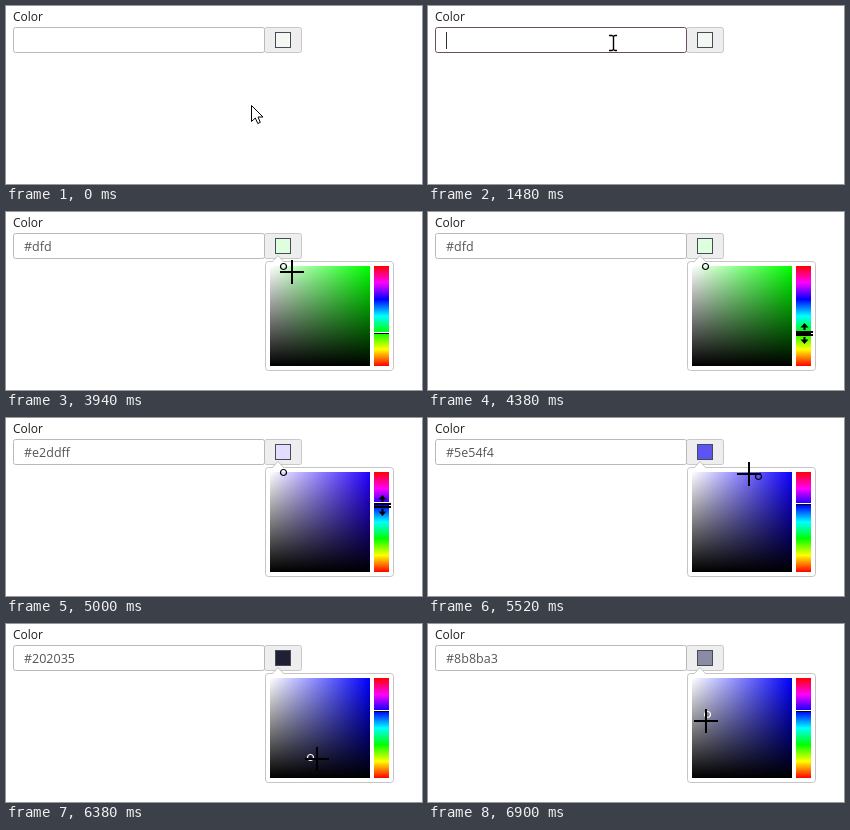
An HTML page that plays this animation: 416x178 px, repeating every 6920 ms.

```html
<!DOCTYPE html>
<html lang="en">
<head>
<meta charset="utf-8">
<title>Color field</title>
<style>
  html, body { margin: 0; width: 100%; height: 100%; overflow: hidden; background: #fff; }
  svg { display: block; width: 416px; height: 178px; font-family: "Open Sans", sans-serif; }
  .crisp { shape-rendering: crispEdges; }
</style>
</head>
<body>
<svg viewBox="0 0 416 178">
  <defs>
    <linearGradient id="saturation">
      <stop stop-color="#fff"/>
      <stop id="pureHue" offset="1"/>
    </linearGradient>
    <linearGradient id="darkness" x2="0" y2="1">
      <stop stop-opacity="0"/>
      <stop offset="1"/>
    </linearGradient>
    <linearGradient id="rainbow" x2="0" y1="1" y2="0"></linearGradient>
  </defs>

  <text x="7" y="15" font-size="12" font-weight="500" fill="#222">Color</text>
  <rect x="258.5" y="21.5" width="37" height="25" rx="2" fill="#eee" stroke="#c8c8c8"/>
  <rect id="field" x="7.5" y="21.5" width="251" height="25" rx="2" fill="#fff"/>
  <rect id="swatch" x="269.5" y="26.5" width="15" height="15" stroke="#444c55"/>
  <text id="value" x="18" y="39" font-size="12.5" fill="#555"></text>
  <rect id="caret" class="crisp" y="26" width="1" height="17" fill="#333"/>

  <g id="popup">
    <rect x="259.5" y="49.5" width="128" height="109" rx="3" fill="#fff" stroke="#c4c4c4"/>
    <path d="M266 50L272 43.5L278 50" fill="#fff" stroke="#c4c4c4"/>
    <path d="M267 50.5H277" stroke="#fff"/>
    <rect x="264" y="54" width="100" height="100" fill="url(#saturation)"/>
    <rect x="264" y="54" width="100" height="100" fill="url(#darkness)"/>
    <rect x="368" y="54" width="15" height="100" fill="url(#rainbow)"/>
    <g id="hueMark" class="crisp">
      <rect x="368" y="-1" width="15" height="1" fill="#fff"/>
      <rect x="368" width="15" height="1"/>
    </g>
    <circle id="handle" r="3" fill="none" stroke-width="1.2"/>
  </g>

  <g id="cursor">
    <path id="arrow" d="M.5 .5V16.5L4.3 13L6.8 18.5L9.3 17.4L7 12H12Z" fill="#fff" stroke="#000"/>
    <path id="ibeam" d="M-4 -7.5H-1L.5 -6.5L2 -7.5H4M.5 -6.5V6.5M-4 7.5H-1L.5 6.5L2 7.5H4" fill="none" stroke="#000" stroke-width="1.4"/>
    <path id="hand" d="M-1.5 11V.5Q0 -2 1.5 .5V7L10 8.5Q11.5 9 11 13L9 19.5H0L-5.5 12Q-5 9 -1.5 12Z" fill="#fff" stroke="#000"/>
    <path id="cross" class="crisp" d="M-12 0H12M0 -12V12" stroke="#000" stroke-width="2"/>
    <g id="resize">
      <path d="M-8 -1.5H9M-8 1.5H9" stroke="#000" stroke-width="2" class="crisp"/>
      <path d="M.5 -10L4.5 -5.5H1.5V-3H-.5V-5.5H-3.5ZM.5 11L4.5 6.5H1.5V4H-.5V6.5H-3.5Z"/>
    </g>
  </g>
</svg>
<script>
const LOOP = 6920, STEP = 20;
const FOCUS = 860, TYPED = [1560, 1920, 2080, 2260], MOUSE_BACK = 2520, POPUP = 3600;
const HUE_PRESS = 4620, SQUARE_PRESS = 5420, DRAG_LAG = 20;
const CURSORS = ['arrow', 'ibeam', 'hand', 'cross', 'resize'];

// Straight mouse moves: start, end, destination x, y
const moves = [
  [60, 80, 246, 99], [360, 880, 185, 37], [2880, 3320, 278, 38],
  [3820, 3940, 286, 60], [3940, 4380, 376, 121], [4620, 5000, 376, 87], [5100, 5420, 352, 97]
];

const $ = id => document.getElementById(id);
const set = (id, attrs) => {
  for (const name in attrs) $(id).setAttribute(name, attrs[name]);
};
const show = (id, on) => set(id, { visibility: on ? 'visible' : 'hidden' });
const clamp = u => Math.max(0, Math.min(1, u));
const ease = (t, from, to) => {
  const u = clamp((t - from) / (to - from));
  return u * u * (3 - 2 * u);
};

// Counterclockwise loops over the colour square, gradually slowing down.
function scribble(t) {
  const s = (t - 5900 + DRAG_LAG) / 1000;
  const angle = (-39.9 + 639.3 * s - 67 * s * s) * Math.PI / 180;
  return [315.32 + 37.07 * Math.cos(angle), 95.3 - 40.17 * Math.sin(angle)];
}

function mouse(t) {
  if (t >= SQUARE_PRESS) return scribble(t);
  return moves.reduce(([x, y], [from, to, toX, toY]) => {
    const u = ease(t, from, to);
    return [x + (toX - x) * u, y + (toY - y) * u];
  }, [245, 99]);
}

function hueAt(t) {
  const dragged = 120 + 128.8 * ease(t, HUE_PRESS, 5000) - 5.2 * ease(t, 5100, 5200);
  return t < 6060 ? dragged : 240;
}

function hsvHex(h, s, v) {
  return '#' + [5, 3, 1].map(n => {
    const k = (n + h / 60) % 6;
    const c = v * (1 - s * Math.max(0, Math.min(k, 4 - k, 1)));
    return Math.round(c * 255).toString(16).padStart(2, '0');
  }).join('');
}

function cursorKind(x, y, open) {
  if (y < 48) return x < 259 ? 'ibeam' : 'hand';
  if (open && y >= 54 && x >= 264 && x <= 364) return 'cross';
  if (open && y >= 54 && x >= 367) return 'resize';
  return 'arrow';
}

function draw(t) {
  const [x, y] = mouse(t), hue = hueAt(t);
  const open = t >= POPUP, focused = t >= FOCUS && !open;
  const typing = t >= TYPED[0] && t < MOUSE_BACK;
  const complete = t >= TYPED[3];

  const [px, py] = t < SQUARE_PRESS ? [264 + 100 * 34 / 255, 54] : scribble(t - DRAG_LAG);
  const brightness = (154 - py) / 100;
  const picked = hsvHex(hue, (px - 264) / 100, brightness);

  $('value').textContent = t >= HUE_PRESS ? picked : '#dfd'.slice(0, TYPED.filter(k => k <= t).length);
  set('swatch', { fill: complete ? picked : '#f5f7f2' });
  set('field', { stroke: focused ? '#6a5064' : '#bdb8bc' });
  set('caret', { x: 18 + Math.round($('value').getComputedTextLength()) });
  show('caret', focused && (typing || (t - FOCUS) % 620 < 260));

  set('popup', { opacity: clamp((t - POPUP + STEP) / 100) });
  set('pureHue', { 'stop-color': hsvHex(hue, 1, 1) });
  set('hueMark', { transform: `translate(0 ${Math.round(154 - hue / 3.6)})` });
  set('handle', {
    transform: `translate(${Math.round(px) + .5} ${Math.round(py) + .5})`,
    stroke: brightness > .75 ? '#000' : '#fff'
  });

  const kind = cursorKind(x, y, open), hidden = typing && t >= TYPED[0] + STEP;
  for (const id of CURSORS) show(id, id === kind && !hidden);
  set('cursor', { transform: `translate(${Math.round(x)} ${Math.round(y)})` });
}

for (let i = 0; i <= 6; i++) {
  const stop = document.createElementNS('http://www.w3.org/2000/svg', 'stop');
  stop.setAttribute('offset', i / 6);
  stop.setAttribute('stop-color', hsvHex(i * 60, 1, 1));
  $('rainbow').append(stop);
}

const start = performance.now();
function tick() {
  const t = (performance.now() - start) % LOOP;
  draw(Math.floor(t / STEP) * STEP);
  requestAnimationFrame(tick);
}
tick();
</script>
</body>
</html>
```
